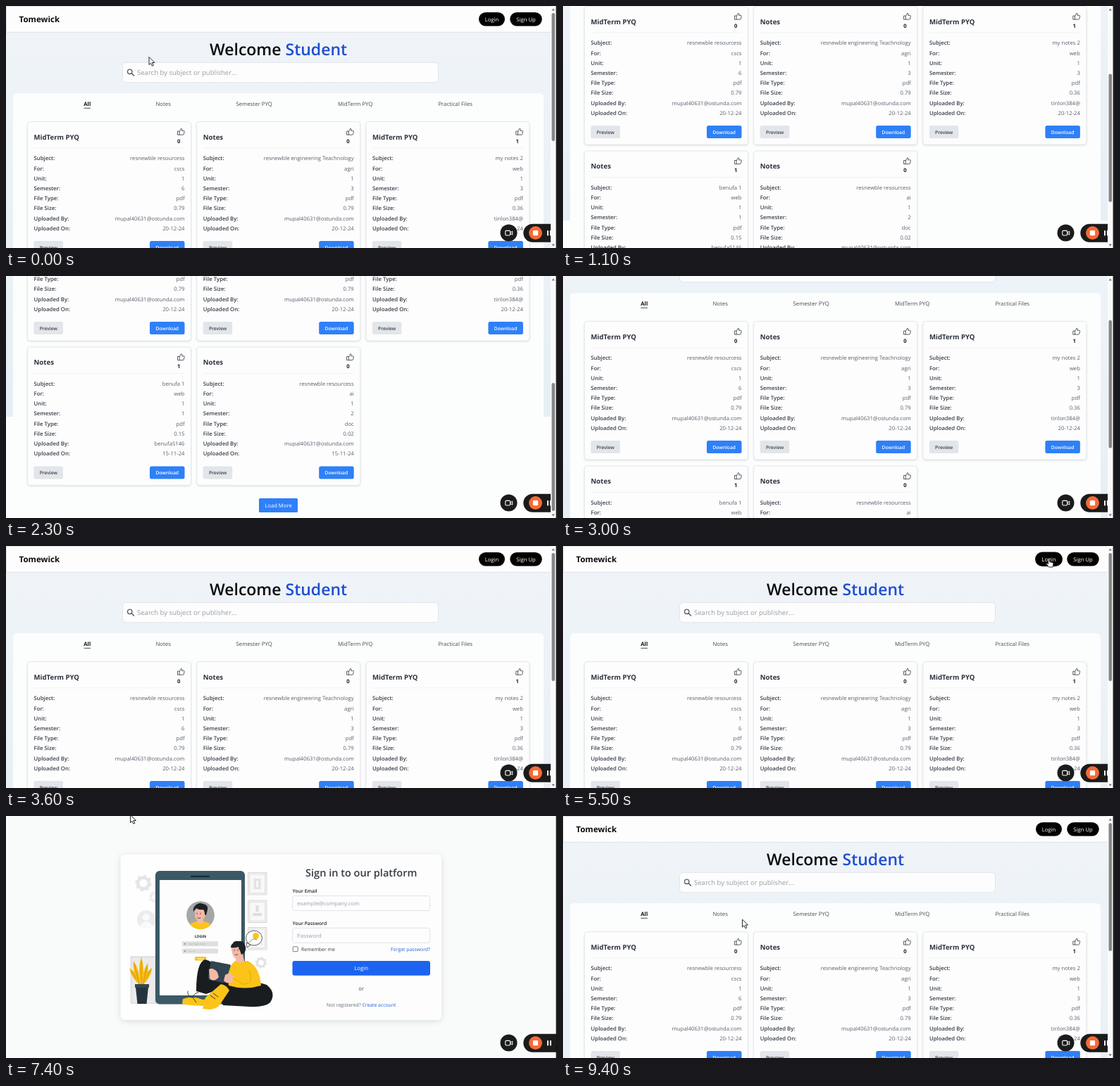
Animation of 782x344 px, one loop 9800 ms. Source, as an HTML page:

```html
<!DOCTYPE html>
<html lang="en">
<head>
<meta charset="utf-8">
<title>Study notes</title>
<style>
  html, body { margin: 0; width: 100%; height: 100%; overflow: hidden; background: #fcfdfd; }
  svg { display: block; }
  text { font-family: "Open Sans", "Noto Sans", sans-serif; text-rendering: geometricPrecision; white-space: pre; }
  .shadow { filter: drop-shadow(0 1px 1px rgba(40, 50, 70, .15)); }
  .deep { filter: drop-shadow(0 2px 4px rgba(40, 50, 70, .15)); }
</style>
</head>
<body>
<svg id="stage" width="782" height="344" viewBox="0 0 782 344">
  <defs>
    <linearGradient id="sky" x1="0" y1="0" x2="0" y2="1">
      <stop offset="0" stop-color="#f0f4f9"/><stop offset="1" stop-color="#e6eff5"/>
    </linearGradient>
    <clipPath id="face"><circle cx="276" cy="141" r="20"/></clipPath>
  </defs>
  <g id="home"><g id="page"></g></g>
  <g id="login"></g>
  <g id="recorder"></g>
  <g id="scrollbar">
    <rect x="773" width="8" height="344" fill="#fafafa"/>
    <path d="M774.5 6.5l2.2-3 2.2 3zM774.5 338.5l2.2 3 2.2-3z" fill="#777"/>
    <rect id="thumb" x="774.5" y="10" width="4.5" height="182" rx="2.2" fill="#868686"/>
  </g>
  <rect x="780.6" width="1.4" height="344" fill="#161616"/>
  <path id="arrow" d="M0 0V11l2.5-2.3 1.9 4 1.9-.9-1.9-3.8H8z" fill="#fff" stroke="#111" stroke-width=".9"/>
  <path id="hand" d="M-.9 1q.9-1.500 1.900 0V5.500l4.700 1.200q1 .4.800 1.600l-.9 4.700H0L-3.500 8.500q.2-1.400 1.600-.7l1 .9z" fill="#fff" stroke="#111" stroke-width=".9"/>
</svg>
<script>
const $ = id => document.getElementById(id);

const text = (x, y, str, size, fill, weight = 400, anchor = 'start') =>
  `<text x="${x}" y="${y}" font-size="${size}" fill="${fill}" font-weight="${weight}" text-anchor="${anchor}">${str}</text>`;
const centered = (x, y, str, size, fill, weight) => text(x, y, str, size, fill, weight, 'middle');
const rect = (x, y, w, h, fill, r = 0, extra = '') =>
  `<rect x="${x}" y="${y}" width="${w}" height="${h}" rx="${r}" fill="${fill}" ${extra}/>`;
const circle = (x, y, r, fill, extra = '') =>
  `<circle cx="${x}" cy="${y}" r="${r}" fill="${fill}" ${extra}/>`;
const path = (d, fill, extra = '') => `<path d="${d}" fill="${fill}" ${extra}/>`;
const line = (d, color, width) =>
  path(d, 'none', `stroke="${color}" stroke-width="${width}" stroke-linecap="round" stroke-linejoin="round"`);

// Landing page
const BODY = 7.7, BLUE = '#2f80f7';
const LABELS = ['Subject', 'For', 'Unit', 'Semester', 'File Type', 'File Size', 'Uploaded By', 'Uploaded On'];
const MAIL = 'mupal40631@ostunda.com';
const CARDS = [
  ['MidTerm PYQ', 0, 'resnewble resourcess', 'cscs', 1, 6, 'pdf', 0.79, MAIL, '20-12-24'],
  ['Notes', 0, 'resnewble engineering Teachnology', 'agri', 1, 3, 'pdf', 0.79, MAIL, '20-12-24'],
  ['MidTerm PYQ', 1, 'my notes 2', 'web', 1, 3, 'pdf', 0.36, 'tirilon384@', '20-12-24'],
  ['Notes', 1, 'benufa 1', 'web', 1, 1, 'pdf', 0.15, 'benufa5146', '15-11-24'],
  ['Notes', 0, 'resnewble resourcess', 'ai', 1, 2, 'doc', 0.02, MAIL, '15-11-24'],
];

function card([title, likes, ...values], i) {
  const x = 30.5 + (i % 3) * 240.2, y = 164.5 + Math.floor(i / 3) * 205.5;
  const rows = LABELS.map((label, n) => {
    const base = 54.8 + n * 14.22;
    return text(9, base, label + ':', 7.8, '#363d49', 600) +
      text(223, base, values[n], BODY, '#58606d', 400, 'end');
  }).join('');
  return `<g transform="translate(${x} ${y})">
    ${rect(0, 0, 232, 196.5, '#fdfdfd', 4, 'stroke="#e3e5e8" stroke-width=".8" class="shadow"')}
    ${text(9, 25.2, title, 9.65, '#2c323e', 700)}
    <g transform="translate(213 9)">${line('M.3 4.5H2.6V9.6H.3zM2.8 4.8L5 .7q1.6 0 1.3 1.8L6 3.8H9q1 .2.7 1.2L8.7 9q-.2.6-.9.6H2.8', '#454b55', .9)}</g>
    ${centered(214.8, 30, likes, 7.7, '#1c1f26', 700)}
    ${rect(9, 37, 214, .7, '#ebedf0')}
    ${rows}
    ${rect(9, 169.5, 41.5, 18, '#e2e5e9', 2.5)}${centered(29.8, 181.2, 'Preview', 6.7, '#3a414c', 600)}
    ${rect(173.5, 169.5, 49.5, 18, BLUE, 2.5)}${centered(198.2, 181.2, 'Download', 6.7, '#fff', 600)}
  </g>`;
}

const pill = (id, cx, w, label) =>
  `<g id="${id}">${rect(cx - w / 2, 9, w, 19.5, '#000', 9.75)}${centered(cx, 21.7, label, 7.7, '#fff', 500)}</g>`;

const tabs = [[223.2, 'Notes'], [352.2, 'Semester PYQ'], [495.7, 'MidTerm PYQ'], [637.7, 'Practical Files']];

$('page').innerHTML =
  rect(0, 0, 773, 613, '#fcfdfd') + rect(0, 0, 773, 469, 'url(#sky)') +
  rect(.4, .4, 773, 36.8, '#fdfdfd', 0, 'stroke="#d9dde1" stroke-width=".8"') +
  text(18.5, 23.2, 'Tomewick', 11.6, '#0c0c0e', 700) +
  pill('loginPill', 689.5, 37, 'Login') + pill('signPill', 738, 45.5, 'Sign Up') +
  centered(386.5, 69.5, 'Welcome <tspan fill="#1d4ed0">Student</tspan>', 23, '#0b0c0f', 600) +
  rect(165.5, 80.3, 448, 28.4, '#fdfdfd', 5, 'stroke="#dce0e5" stroke-width=".8"') +
  line('M178.5 96l3 3', '#5c5f64', 1.6) + circle(175.7, 93.3, 3.2, 'none', 'stroke="#5c5f64" stroke-width="1.4"') +
  text(186, 98.4, 'Search by subject or publisher...', 9.56, '#999ea5') +
  path('M10 613V130q0-6 6-6H757q6 0 6 6V613z', '#fcfdfd') +
  centered(115.2, 142.2, 'All', 7.8, '#15171b', 700) + rect(110.5, 144.8, 9.5, .8, '#222') +
  tabs.map(([x, name]) => centered(x, 142.2, name, 7.8, '#454b55', 500)).join('') +
  CARDS.map(card).join('') +
  rect(359, 585, 55, 20, BLUE, 1.5) + centered(386.5, 597.9, 'Load More', BODY, '#fff');

// Sign-in page
const DARK = '#1d2226', TROUSERS = '#191d20', TEAL = '#3b5966', YELLOW = '#fcc419', SKIN = '#f3b9a6';

const gear = (x, y, r, color) =>
  circle(x, y, r * .68, 'none', `stroke="${color}" stroke-width="${r * .4}"`) +
  circle(x, y, r * .9, 'none', `stroke="${color}" stroke-width="${r * .25}" pathLength="16" stroke-dasharray="1"`);
const frame = (y, inner) =>
  rect(343.5, y, 26.5, 31.5, '#f0f0f0', 0, 'stroke="#d4d4d4" stroke-width=".9"') +
  rect(346, y + 2.5, 21.5, 26.5, '#f8f8f8', 0, 'stroke="#dedede" stroke-width=".8"') + inner;
const leaf = (x, y, tilt, len) =>
  `<g transform="translate(${x} ${y}) rotate(${tilt})">${path(`M0 0Q-6 ${-len * .55} 0 ${-len}Q6 ${-len * .55} 0 0`, '#f6b90e')}
   ${line(`M0 0V${-len * .85}`, '#b77f09', .5)}</g>`;

const scenery =
  gear(195, 95.5, 11.5, '#e6e6e6') + gear(211, 115, 8, '#ededed') + gear(362, 208.5, 8, '#e3e3e3') +
  circle(199, 147, 13, '#ececec') + circle(199, 144, 5, '#fafafa') + path('M190 156q9-12 18 0q-9 8-18 0', '#fafafa') +
  frame(80.5, rect(351.5, 89, 10, 15, '#e3e3e3') + rect(355, 92, 3, 9, '#f8f8f8')) +
  frame(120, rect(354.5, 127, 4, 9, '#dedede') + path('M350 138h13v4h-13z', '#dedede')) +
  frame(158.5, line('M350 182H364', '#dedede', 1)) +
  rect(176.5, 199, 37, 68, '#e2e2e2') + rect(179, 202, 32, 63, '#ebebeb') +
  leaf(192, 242, -33, 31) + leaf(192, 242, 30, 31) + leaf(190, 242, -14, 38) + leaf(194, 242, 12, 34) + leaf(192, 242, 0, 42) +
  path('M184 243H202L199.5 267H186.5z', '#26343b') + rect(183, 239, 20, 5, '#36474f');

const phone =
  rect(212, 78, 127, 189.5, TEAL, 6) + rect(218, 91, 116, 164, '#fdfdfd', 1) + rect(262, 84.8, 27, 2.2, '#172d37', 1.1) +
  `<g clip-path="url(#face)">${circle(276, 141, 20, '#a6a6a6')}
    ${path('M257 163q2-12 14-13h9q13 1 15 13z', YELLOW)}
    ${path('M271 144h9v7q-4 4-9 0z', SKIN)}${path('M268 134q7-4 14-1l1 8q-2 8-8 8t-7-8z', SKIN)}
    ${path('M266 136q-1-5 2-8q5-6 12-3q7 1 6 8l-2 8l-2-1q0-5-2-7q-6 1-10-2z', DARK)}
    ${line('M271 138v1.5M276 138v1.5M272 145q2 1 4 0', DARK, .7)}</g>` +
  centered(276, 172.8, 'LOGIN', 5.2, '#25282c', 700) +
  [178.3, 188.6].map((y, i) => rect(250, y, 51, 7, '#dfdfdf', 1) + circle(254, y + 3.5, 1.1, '#8c8c8c') +
    text(259, y + 5, i ? '* * * *' : 'Your login name', 3.2, '#999')).join('') +
  rect(268, 200, 16, 5.5, YELLOW, .8) + centered(276, 203.9, 'LOGIN', 2.6, '#fff', 700);

const reader =
  path('M308 239Q350 232 370 240Q384 251 375 265Q368 272 345 271L308 269L301 254z', TROUSERS) +
  path('M270 249Q270 207 283 204Q294 206 304 222L334 239L322 256Q306 258 298 248L284 253z', TROUSERS) +
  path('M316 241Q313 215 325 206H343Q360 214 362 241Q339 248 316 241z', YELLOW) +
  line('M345 220Q353 238 337 239L321 230', '#d99e0d', .8) +
  path('M326 198l10-2 2 10q-6 5-12 0z', SKIN) +
  path('M320 186q6-4 14-2l4 5q0 6-3 9q-5 5-10 4q-5-4-5-16', SKIN) +
  path('M319 187q0-4 3-6q2-4 8-3q7-1 9 5q3 6-1 12l-4 2l-2-6q-2-2-2-5q-6 2-11 1', DARK) +
  line('M324 190v1.4M329 190v1.4M325 197q2 1 4 0', DARK, .7) +
  path('M291 206L317 211Q320 211 318 216L312 235Q311 238 307 237L289 233Q286 232 287 228z', '#324550') +
  path('M288 218q6-3 12 4l2 7q-7 8-13 2zM311 226q7-5 13 2l-3 8q-7 4-12-2z', SKIN) +
  path('M283 258L305 239Q313 240 317 248L307 263Q301 275 289 275L279 274z', YELLOW) +
  path('M251 260Q266 255 279 261L300 258L304 266L282 270Q262 270 250 267z', YELLOW) +
  line('M258 249q-1 7 6 9M273 251q-5 0-9 7M265 258l5 7M290 255l7 5M294 252l7 5', '#2b2c2e', .9) +
  path('M342 187L341 180L347 183z', '#fff', 'stroke="#303235" stroke-width=".8"') +
  `<ellipse cx="352" cy="173.500" rx="11.500" ry="10.500" fill="#fff" stroke="#303235" stroke-width=".8"/>` +
  circle(354.5, 170.5, 4.5, YELLOW) + line('M345 180q5-8 11-4', '#55585b', .7);

const field = (y, label, hint) =>
  text(406.8, y - 4.4, label, 6.8, '#22272f', 600) +
  rect(406.7, y, 195, 21, '#fdfdfd', 3, 'stroke="#d8dce2" stroke-width=".8"') + text(413, y + 13.5, hint, 7.75, '#989fa9');

$('login').innerHTML =
  rect(0, 0, 782, 344, '#f9fbfb') + rect(162.5, 54.5, 455.5, 235.5, '#fdfdfd', 6, 'class="deep"') +
  rect(163, 55, 228, 234.5, '#fefefe', 6) + scenery + phone + reader +
  centered(504.2, 85.9, 'Sign in to our platform', 14.55, '#363c47', 600) +
  field(113.5, 'Your Email', 'example@company.com') + field(159.2, 'Your Password', 'Password') +
  rect(407.2, 185.7, 7, 7, '#fff', 1, 'stroke="#555b63" stroke-width=".8"') +
  text(419, 192, 'Remember me', 6.9, '#333943', 500) +
  text(602, 192, 'Forget password?', 6.85, '#2361d9', 400, 'end') +
  rect(406.5, 206, 195.5, 20.8, '#1c64f0', 3) + centered(504.2, 219.4, 'Login', 7.8, '#fff', 500) +
  centered(504.2, 248, 'or', BODY, '#444b55') +
  centered(504.2, 271.2, 'Not registered? <tspan fill="#2361d9">Create account</tspan>', 6.85, '#636b77');

// Screen recorder controls
const WHITE_LINE = 'stroke="#fff" stroke-width="1.1"';
$('recorder').innerHTML =
  circle(713.5, 322.5, 12, '#1b1b1c') +
  rect(708.8, 319.4, 6.8, 6.6, 'none', 1.2, WHITE_LINE) +
  line('M716 322l2.7-1.8v5L716 323.5', '#fff', 1) +
  rect(734.3, 309.7, 60, 26, '#1b1b1c', 13) + circle(751.5, 322.6, 9.5, '#f66a35') +
  rect(747.9, 319.1, 7.2, 7.2, '#fff', 1) + rect(768, 319, 1.9, 7.5, '#fff', .4) + rect(771.9, 319, 1.9, 7.5, '#fff', .4);

// Timeline: keys are [ms, ...values]
const LOOP = 9800, STEP = 100;
const SCROLL = [[0, 0], [600, 0], [1100, 164], [1600, 225], [2000, 225], [2300, 269], [2400, 269],
  [2700, 200], [2800, 200], [3000, 100], [3500, 0]];
const MOVES = [
  { from: 0, to: 400, keys: [[0, 203, 72.5], [300, 705, 22]] },
  { from: 3900, to: 5700, keys: [[3900, 735, 140], [4300, 470, 205], [4800, 640, 80], [5300, 688, 22], [5500, 689.5, 17]] },
  { from: 5700, to: 8300, keys: [[5800, 690, 22], [6300, 510, 150], [6800, 260, 60], [7000, 176.5, -1.5]] },
  { from: 8800, to: LOOP, keys: [[8800, 150, 5], [8900, 254.5, 147]] },
];

function at(keys, t) {
  const next = keys.findIndex(k => k[0] > t);
  if (next < 0) return keys[keys.length - 1].slice(1);
  if (next === 0) return keys[0].slice(1);
  const a = keys[next - 1], b = keys[next], u = (t - a[0]) / (b[0] - a[0]);
  return a.slice(1).map((v, i) => v + (b[i + 1] - v) * u);
}
const show = (id, on) => $(id).setAttribute('visibility', on ? 'visible' : 'hidden');

function draw(t) {
  const signIn = t >= 5700 && t < 8300;
  show('home', !signIn);
  show('scrollbar', !signIn);
  show('login', signIn);

  const [scroll] = at(SCROLL, t);
  $('page').setAttribute('transform', `translate(0 ${-scroll})`);
  $('thumb').setAttribute('y', 10 + scroll * .528);

  const move = MOVES.find(m => t >= m.from && t < m.to);
  const [x, y] = move ? at(move.keys, t) : [-50, -50];
  const hover = !signIn && y > 9 && y < 28 && x > 671 && x < 708;
  show('arrow', move && !hover);
  show('hand', move && hover);
  $(hover ? 'hand' : 'arrow').setAttribute('transform', `translate(${x} ${y})`);
  $('loginPill').setAttribute('transform', hover ? 'translate(689.5 18.75) scale(1.05) translate(-689.5 -18.75)' : '');
}

const start = performance.now();
function tick() {
  const t = (performance.now() - start) % LOOP;
  draw(Math.floor(t / STEP) * STEP);
  requestAnimationFrame(tick);
}
tick();
</script>
</body>
</html>
```
